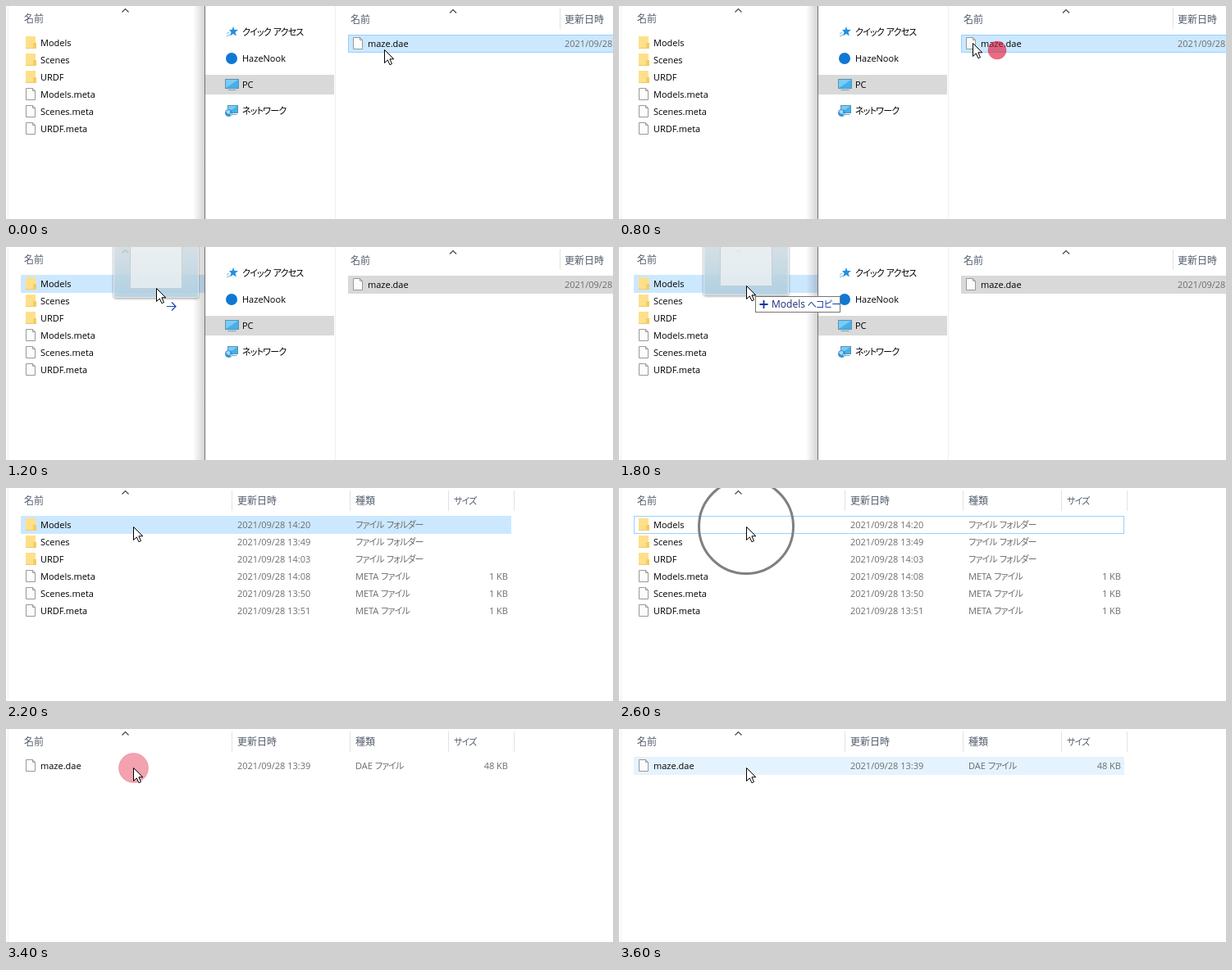
Animation of 740x260 px, one loop 4400 ms. Source, as an HTML page:

```html
<!DOCTYPE html>
<html lang="ja">
<head>
<meta charset="utf-8">
<title>ファイルのコピー</title>
<style>
  html, body { margin: 0; width: 100%; height: 100%; overflow: hidden; background: #fff; }
  svg { display: block; width: 740px; height: 260px; }
  text { font: 11px "Open Sans", "Noto Sans CJK JP", "Noto Sans CJK", sans-serif; font-feature-settings: "palt"; white-space: pre; }
  .kana { letter-spacing: -.8px; }
  .head { font-size: 12px; font-feature-settings: normal; fill: #535d6d; }
  .size { fill: #535d6d; }
  .info { fill: #6d6d6d; }
  .end { text-anchor: end; }
  .tip { fill: #12349c; }
  .target { font-size: 12px; fill: #1c2c74; }
  .glass { filter: drop-shadow(.5px 1px 1.5px #0008); }
</style>
</head>
<body>
<svg viewBox="0 0 740 260">
  <defs>
    <linearGradient id="shade"><stop stop-opacity="0"/><stop offset="1" stop-opacity=".17"/></linearGradient>
    <linearGradient id="glass" x2="0" y2="1">
      <stop offset=".2" stop-color="#f2fafd" stop-opacity=".75"/>
      <stop offset="1" stop-color="#c3e6fa" stop-opacity=".75"/>
    </linearGradient>
  </defs>
  <g id="stage"></g>
</svg>
<script>
const LOOP = 4400;

const STYLES = {
  drop: ['#cce8ff'],
  selected: ['#cce8ff', '#99d1ff'],
  focus: ['#fff', '#99d1ff'],
  hover: ['#e5f3ff'],
  idle: ['#d9d9d9']
};

// Each step holds until the next one begins.
const STEPS = [
  { at: 0, pointer: [461, 53], source: 'selected' },
  { at: 800, pointer: [431, 45], source: 'selected', clicks: [[461, 54, 11]] },
  { at: 1000, pointer: [265, 49], source: 'idle', clicks: [[461, 53, 25]], drag: 'arrow' },
  { at: 1200, pointer: [183, 50], source: 'idle', row: 'drop', drag: 'arrow' },
  { at: 1400, pointer: [155, 47], source: 'idle', row: 'drop', drag: 'move' },
  { at: 1800, pointer: [155, 47], source: 'idle', row: 'drop', drag: 'copy' },
  { at: 2200, pointer: [155, 47], row: 'drop' },
  { at: 2600, pointer: [155, 47], row: 'focus', ring: 57.5 },
  { at: 2800, pointer: [155, 47], row: 'hover' },
  { at: 3000, pointer: [155, 47], row: 'hover', clicks: [[155.5, 47.5, 3.5]] },
  { at: 3200, pointer: [155, 47], row: 'selected', clicks: [[155.5, 47, 14.5], [155.5, 47, 5]] },
  { at: 3400, pointer: [155, 47], opened: true, clicks: [[155.5, 47.5, 18]] },
  { at: 3600, pointer: [155, 47], opened: true, row: 'hover' }
];

const FOLDER = 'ファイル フォルダー', META = 'META ファイル';
const PARENT = [
  ['Models', '14:20', FOLDER], ['Scenes', '13:49', FOLDER], ['URDF', '14:03', FOLDER],
  ['Models.meta', '14:08', META, '1 KB'], ['Scenes.meta', '13:50', META, '1 KB'],
  ['URDF.meta', '13:51', META, '1 KB']
];
const CHILD = [['maze.dae', '13:39', 'DAE ファイル', '48 KB']];

const rect = (x, y, w, h, fill, extra = '') =>
  `<rect x="${x}" y="${y}" width="${w}" height="${h}" fill="${fill}" ${extra}/>`;
const path = (d, fill, stroke = 'none', extra = '') =>
  `<path d="${d}" fill="${fill}" stroke="${stroke}" ${extra}/>`;
const span = (s, cls) => `<tspan class="${cls}">${s}</tspan>`;
const tightKana = s => s.replace(/[へァ-ヶー]+/g, run => span(run, 'kana'));
const text = (x, y, s, cls = '') =>
  `<text x="${x}" y="${y}" class="${cls}">${tightKana(s)}</text>`;
const group = (x, y, body) => `<g transform="translate(${x} ${y})">${body}</g>`;
const circle = (x, y, r, fill, extra = '') =>
  `<circle cx="${x}" cy="${y}" r="${r}" fill="${fill}" ${extra}/>`;

const highlight = (x, y, w, h, style) => {
  if (!style) return '';
  const [fill, line] = STYLES[style];
  return line
    ? rect(x + .5, y + .5, w - 1, h - 1, fill, `stroke="${line}"`)
    : rect(x, y, w, h, fill);
};

const chevron = (x, y) => path(`M${x - 4} ${y}l4-4 4 4`, 'none', '#444', 'stroke-width="1.2"');
const divider = x => rect(x, 3, 1, 25, '#e2e2e2');

const fileIcon = (x, y) => group(x, y,
  path('M.5 .5H8.5L11.5 3.5V14.5H.5Z', '#fcfcfc', '#999') +
  path('M8.5 .5V3.5H11.5', 'none', '#999'));

const folderIcon = (x, y) => group(x, y,
  rect(0, 0, 12, 15, '#ffe08a') +
  rect(9, 8, 4, 7, '#f4cd62') +
  path('M0 14.5H9', 'none', '#efca66'));

const starIcon = group(276, 31,
  path('M1-6L2.5-2 7-2 3.5 1 5 5.5 1 3-3 5.5-1.5 1-4-2-.5-2Z', '#2490df') +
  path('M-7 3l3-2M-7 6l4-2', 'none', '#64b5ee'));

const monitor = (x, y, w, h) => group(x, y,
  rect(.5, .5, w - 1, h - 1, '#7accf5', 'stroke="#5a93b5"') +
  path(`M1 ${h - 1}L${w - 1} 1V${h - 1}Z`, '#45b0ea') +
  rect(w / 2 - 5, h + 1, 10, 1, '#6fa3bf'));

const networkIcon = monitor(270, 121, 13, 10) +
  circle(271.5, 130.5, 4.5, '#3a93d2') +
  path('M268 129q4-4 5-1t-2 4zM273 131l3 0-2 3z', '#a5daf3');

function folderList({ row, opened }) {
  const items = opened ? CHILD : PARENT;
  const heads = [[22, '名前'], [282, '更新日時'], [426, '種類']];
  return rect(2, 0, 1, 260, '#f0f0f0') +
    heads.map(([x, s]) => text(x, 20, s, 'head')).join('') +
    text(546, 20, 'サイズ', 'size') +
    [275, 419, 539, 619].map(divider).join('') + chevron(145.5, 7.5) +
    highlight(18, 34, 598, 22, row) +
    items.map(([name, time, type, size = ''], i) => {
      const y = 49 + 21 * i;
      const icon = type === FOLDER ? folderIcon : fileIcon;
      return icon(24, y - 12) + text(42, y, name) +
        text(282, y, '2021/09/28 ' + time, 'info') +
        text(426, y, type, 'info') + text(612, y, size, 'info end');
    }).join('');
}

function sourceWindow(style) {
  return rect(228, 0, 14, 260, 'url(#shade)') +
    rect(242, 0, 498, 260, '#fff') + rect(242, 0, 1, 260, '#747474') +
    rect(243, 84, 157, 24, '#d9d9d9') + rect(401, 0, 1, 260, '#f0f0f0') +
    starIcon + circle(275, 64, 7, '#0f78d4') + monitor(267, 89, 17, 12) + networkIcon +
    ['クイック アクセス', 'HazeNook', 'PC', 'ネットワーク']
      .map((s, i) => text(288, 36 + 32 * i, s)).join('') +
    text(420, 21, '名前', 'head') + text(681, 21, '更新日時', 'head') +
    divider(675) + chevron(545, 8.5) +
    highlight(417, 35, 330, 22, style) +
    fileIcon(423, 38) + text(441, 50, 'maze.dae') +
    text(681, 50, '2021/09/28 13:39', 'info');
}

const arrowMark = (x, y) =>
  path(`M${x - 6} ${y}h11m-5-5l5 5-5 5`, 'none', '#2148b4', 'stroke-width="1.2"');

const ghost = (x, y) => group(x, y,
  rect(-51.5, -85.5, 103, 97, 'url(#glass)', 'rx="2.5" stroke="#fff" stroke-opacity=".6" class="glass"') +
  rect(-31.5, -75, 63, 75.5, '#f3f5f6', 'fill-opacity=".7" stroke="#c5ced4"'));

function dropTip(x, y, kind) {
  if (kind === 'arrow') return arrowMark(x + 19, y + 22.5);
  const copy = kind === 'copy';
  const mark = copy
    ? path('M5.5 10h10M10.5 5v10', 'none', '#14349c', 'stroke-width="1.8"')
    : arrowMark(11, 10);
  return group(x + 11, y + 13,
    rect(.5, .5, copy ? 103 : 102, 19, '#fff', 'stroke="#767676"') + mark +
    text(20, 14, span('Models', 'target') + (copy ? ' へコピー' : ' へ移動'), 'tip'));
}

const click = ([x, y, r]) => {
  const alpha = Math.max(0, 1 - r / 30);
  return circle(x, y, r, '#e0183a',
    `fill-opacity="${alpha}" stroke="#e0183a" stroke-opacity="${alpha * .5}"`);
};

const pointer = (x, y) => group(x, y,
  path('M.5 .5V16.5L4.3 12.9 6.9 18.7 9.5 17.6 6.9 11.8H11.8Z', '#fff', '#000'));

function draw(step) {
  const { pointer: [x, y], source, drag, ring, clicks = [] } = step;
  return folderList(step) +
    (source ? sourceWindow(source) : '') +
    (drag ? ghost(x, y) + dropTip(x, y, drag) : '') +
    clicks.map(click).join('') +
    (ring ? circle(x, y, ring, 'none', 'stroke="#808080" stroke-width="3"') : '') +
    pointer(x, y);
}

const stage = document.getElementById('stage');
const start = performance.now();
let shown;

function tick(now) {
  const t = Math.max(0, now - start) % LOOP;
  const step = STEPS.filter(s => s.at <= t).pop();
  if (step !== shown) {
    stage.innerHTML = draw(step);
    shown = step;
  }
  requestAnimationFrame(tick);
}
tick(start);
</script>
</body>
</html>
```
